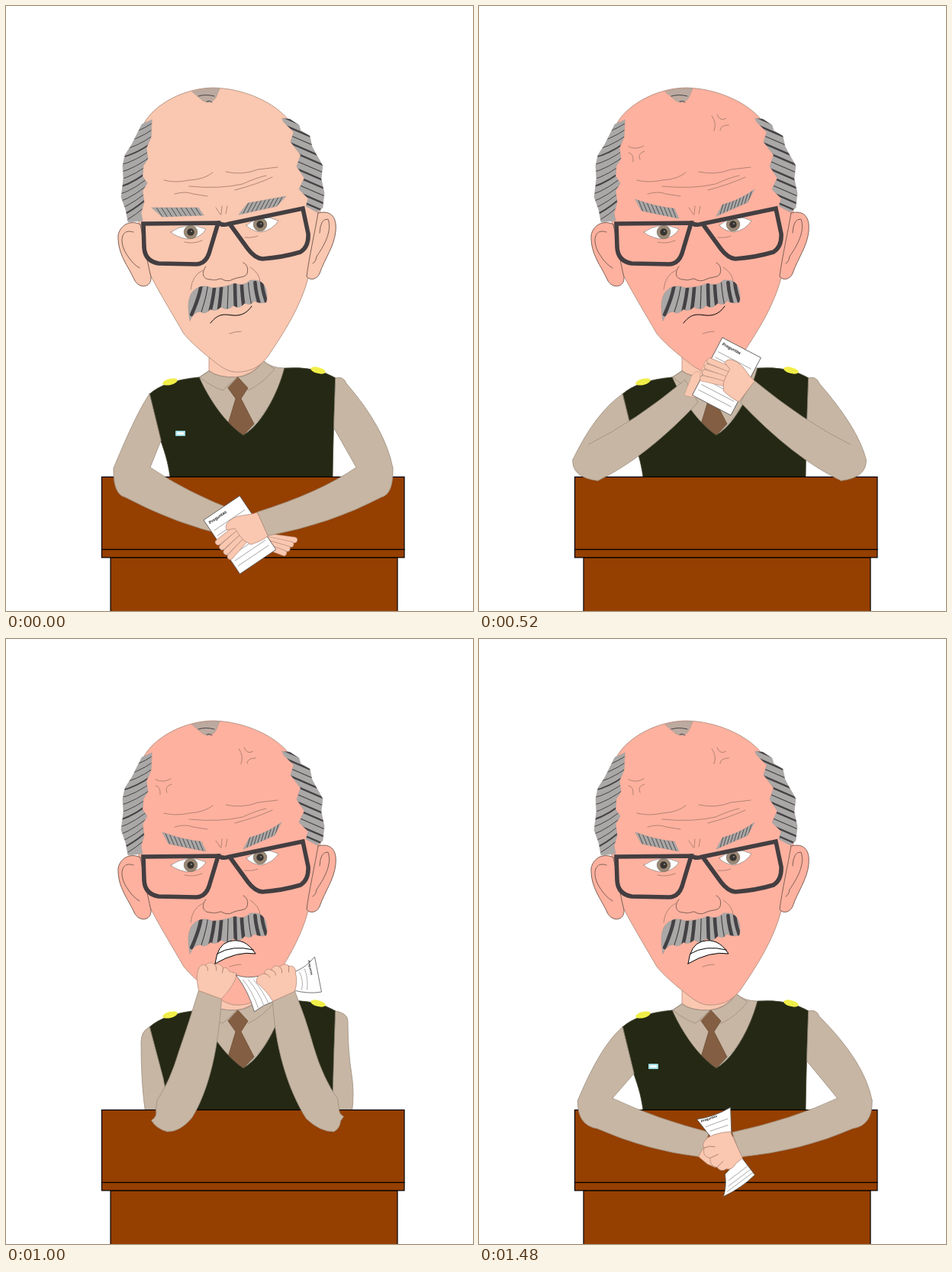
These frames come from a looping animation (612 px wide and 792 px high, 1.52 s). An HTML page:

```html
<!DOCTYPE html>
<html lang="es">
<head>
<meta charset="utf-8">
<title>Angry man at a desk</title>
<style>
html, body { margin: 0; width: 100%; height: 100%; overflow: hidden; background: #fff; }
svg { display: block; width: 612px; height: 792px; --skin: rgb(250,199,176); }
path, line { stroke-linecap: round; stroke-linejoin: round; }
.sleeve { fill: #c7b6a3; stroke: #9c8e80; stroke-width: .8; }
.face { fill: var(--skin); stroke: #a88878; stroke-width: .8; }
.hand { fill: #fac7b0; stroke: #b98f7e; stroke-width: .8; }
.finger { fill: none; stroke: #b98f7e; stroke-width: 8; }
.finger.in { stroke: #fac7b0; stroke-width: 6.6; }
.thin { fill: none; stroke: #a07868; stroke-width: .8; }
.ear { stroke: #7d6055; stroke-width: 1; }
.hair { fill: #aaa8a7; stroke: #a29c9a; stroke-width: .6; }
.dark { fill: none; stroke: #454245; }
.paper { fill: #fff; stroke: #555; stroke-width: .8; }
.rule { fill: none; stroke: #999; stroke-width: .8; }
.desk { fill: #953f00; stroke: #000; stroke-width: 1.2; }
.frame { fill: none; stroke: #433e41; stroke-width: 5.6; }
.ink { fill: none; stroke: #000; stroke-width: 1; }
text { font: bold 5.5px "Liberation Sans", Arial, sans-serif; fill: #222; }
</style>
</head>
<body>
<svg viewBox="0 0 612 792">
  <defs>
    <path id="hairL" d="M191 149L178 155 172 167 165 181 156 195 153 209 154 226 151 250 157 267 160 283 179 281 177 271 181 257 179 242 185 232 179 223 180 209 186 200 184 186 190 172Z"/>
    <path id="hairR" d="M362 147L372 148 384 156 386 163 398 170 401 184 407 195 415 209 413 226 417 245 415 264 408 270 393 262 396 252 384 240 391 225 381 210 386 195 373 178 377 165 364 152Z"/>
    <path id="tache" d="M241 412Q236 388 243 376Q254 362 270 369Q285 369 300 363Q311 368 320 359Q338 357 341 372Q343 383 341 388Q331 390 325 386Q321 393 313 389Q305 398 298 392Q290 400 282 394Q274 401 268 397Q260 405 255 400Q246 400 241 412Z"/>
    <path id="browL" d="M191 264L252 264 259 274 205 276Z"/>
    <path id="browR" d="M305 273L317 258 367 249 355 262Z"/>
    <path id="madL" d="M205 253Q232 263 256 265L262 278Q235 273 213 268Z"/>
    <path id="madR" d="M311 275L319 260Q342 254 361 240L352 257Z"/>
    <path id="vein" d="M-10-7Q0-2 10-8M-10 1Q-3 2-4 13M11-1Q1 2 5 10"/>
  </defs>

  <g id="body">
    <path class="sleeve" d="M253 486L268 476 337 464Q347 474 365 474Q350 530 311 562Q275 540 253 486Z"/>
    <path class="hand" stroke="none" d="M266 455L266 477Q276 486 300 486Q322 484 336 466L336 455Z"/>
    <path class="sleeve" d="M254 486L266 478Q278 487 303 486L284 503Q270 499 254 486ZM303 486Q325 484 337 465L352 475Q338 493 318 503Z"/>
    <path fill="#835e42" stroke="#694a33" stroke-width=".7" d="M304 486L317 500 308 514 325 547 311 562 291 547 301 514 291 500Z"/>
    <path fill="#242814" stroke="#4c4a38" stroke-width=".8" d="M188 508Q208 490 253 486C266 515 287 546 311 562C337 546 357 505 365 474Q405 471 432 487Q429 545 428 617L215 617C210 575 192 555 188 508Z"/>
    <ellipse cx="215" cy="492" rx="10" ry="4" fill="#f0ee48" transform="rotate(-14 215 492)"/>
    <ellipse cx="409" cy="477" rx="10" ry="4" fill="#f0ee48" transform="rotate(15 409 477)"/>
    <rect x="222" y="556" width="13" height="7" rx="1" fill="#9fdce0"/>
    <rect x="224" y="558" width="9" height="3" fill="#fff"/>
  </g>

  <g id="head">
    <path class="face" d="M180 155C194 128 235 107 272 107C312 108 352 126 371 150L400 200 412 268 396 356C386 394 364 428 343 459C330 476 314 480 299 479C284 477 275 466 266 460C255 451 242 440 233 429C218 403 205 382 190 354L180 325 174 285 172 200Z"/>
    <path class="face ear" d="M176 286C165 280 150 285 147 300C146 325 160 340 168 358C174 371 191 369 190 355C184 330 180 305 176 286Z"/>
    <path class="face ear" d="M409 271C425 267 434 275 432 295C430 315 418 330 411 350C408 358 398 360 394 354C397 330 405 295 409 271Z"/>
    <path class="thin ear" d="M167 296C150 290 148 310 158 325Q166 338 175 343M411 297Q412 278 422 279C428 295 416 315 407 328Q406 335 402 337"/>
    <path fill="#bcaaa0" stroke="#a29890" stroke-width=".6" d="M244 112Q260 107 280 108L275 120Q268 130 258 124Z"/>
    <path class="dark" d="M252 118Q262 115 273 118M263 125Q267 123 270 126"/>
    <g id="locks"></g>
    <path class="thin" d="M207 228Q222 232 240 228Q260 227 271 218M288 217Q310 222 330 214L356 211M240 236Q280 240 310 233Q330 224 341 222M221 246Q235 242 245 246L264 249M300 241Q330 233 349 224M275 264L281 273M282 273L283 262M288 272L290 262"/>
    <g id="calm"></g>
    <g id="mad">
      <use href="#vein" class="thin" transform="translate(206 191)"/>
      <use href="#vein" class="thin" transform="translate(314 153) rotate(-95)"/>
    </g>
    <path fill="#fff" stroke="#8d7d77" stroke-width=".7" d="M216 296Q238 281 262 292Q256 304 237 305Q222 302 216 296ZM315 287Q335 270 357 281Q350 293 334 296Q320 294 315 287Z"/>
    <g id="eyes"></g>
    <path class="thin" d="M234 309Q245 312 257 307M313 303Q323 304 330 301M242 371Q244 352 258 346M320 342Q333 350 333 362M293 429Q300 426 308 426"/>
    <path class="thin ear" d="M262 341C256 348 257 358 268 358C275 360 278 357 282 357Q290 362 297 358C305 354 314 356 316 350C318 342 315 338 311 336"/>
    <path class="frame" style="stroke-linejoin:miter" d="M180 285L278 284 266 324Q261 338 249 338L200 337Q182 334 181 316ZM293 285L389 265 396 298Q397 315 386 322Q363 329 336 331Q326 330 317 318ZM278 284Q285 288 293 285"/>
    <g id="whisk"></g>
    <path id="flat" class="ink" d="M268 415C279 401 287 404 298 405C310 406 317 400 322 393"/>
    <g id="snarl">
      <path class="ink" style="fill:#fff" d="M274 425Q277 400 292 396Q313 390 327 412Q303 408 274 425Z"/>
      <path class="ink" d="M277 412Q297 400 324 407"/>
    </g>
  </g>

  <g id="upper">
    <path class="sleeve" d="M188 508Q177 513 177 528Q177 585 183 622L215 622 206 575Z"/>
    <path class="sleeve" d="M432 487Q448 490 448 500Q448 540 453 570Q457 595 453 622L428 622Z"/>
  </g>

  <g id="desk">
    <rect class="desk" x="137" y="722" width="376" height="75"/>
    <rect class="desk" x="125.5" y="616.5" width="396.5" height="95"/>
    <rect class="desk" x="125.5" y="711.5" width="396.5" height="10.5"/>
  </g>

  <g id="swing">
    <g id="armL"><path class="sleeve"/><path class="sleeve"/></g>
    <g id="handL">
      <g class="open" id="openL" transform="translate(-14 0)"><path class="hand" d="M0-16L38-10Q60-10 66 4L66 18 50 32 0 16Z"/></g>
      <path class="hand fist" d="M-4-17Q5-32 18-33Q28-37 31-30Q39-26 33-18Q37 0 30 12L20 16Q10 17 5 17Z"/>
    </g>
    <g id="armR"><path class="sleeve"/><path class="sleeve"/></g>
    <g id="handR">
      <g class="open" id="openR">
        <g transform="translate(-77 -5) rotate(-34)">
          <rect class="paper" width="57" height="85"/>
          <path class="rule"/>
          <text x="4" y="9">Preguntas</text>
        </g>
      </g>
      <g class="fist" transform="rotate(-50.7)">
        <path class="paper" d="M-13-60Q5-46 29-40L2-11-17-27ZM-38 17Q-48 30-60 36Q-35 45-11 45L-7 16Z"/>
        <path class="rule" d="M-12-45L16-32M-12-37L10-26M-12-30L4-19M-40 26L-10 30M-46 31L-10 36M-52 35L-11 41"/>
        <text transform="translate(-12 -53) rotate(26)" style="font-size:4.5px">Preguntas</text>
        <path class="hand" d="M6-18Q-8-30-20-33Q-32-34-33-27Q-43-21-37-12Q-45-4-39 3Q-40 12-32 13Q-28 20-18 17L-7 18Z"/>
        <path class="thin" d="M-33-27Q-25-24-22-18M-37-12L-26-8M-39 3L-28 3"/>
      </g>
    </g>
  </g>

  <g id="raised">
    <g id="upL">
      <path class="sleeve" d="M190 603Q206 580 218 540Q232 500 244 460L274 470C270 535 258 590 235 627Q220 645 203 645Q188 641 182 630Q190 626 188 616Z"/>
      <path class="hand" d="M244 460Q240 442 243 434Q246 424 253 427Q259 421 265 426Q273 424 276 431Q281 428 284 435L294 438Q292 452 274 471Z"/>
      <path class="thin" d="M253 427Q257 430 256 434M265 426Q268 429 267 434M276 431L275 437"/>
    </g>
    <g id="upR">
      <path class="paper" d="M310 440Q325 445 341 441L360 474Q345 479 334 488Q326 460 310 440ZM386 436Q402 430 413 416L422 462Q405 465 386 460Z"/>
      <path class="rule" d="M319 446Q332 462 339 483M326 446Q340 462 346 479M333 446Q346 462 352 476M393 436Q399 447 396 459M400 432Q405 446 403 459"/>
      <text transform="translate(404 421) rotate(78)" style="font-size:4px">Preguntas</text>
      <path class="sleeve" d="M443 602Q424 575 412 535Q402 498 387 461L358 474C361 535 378 590 402 628Q420 645 438 645Q446 641 447 631L451 625Q445 622 445 616Z"/>
      <path class="hand" d="M358 474Q350 460 337 450Q335 440 347 438Q348 430 356 433Q360 425 367 429Q374 423 379 428Q389 427 388 438Q391 448 387 461Z"/>
      <path class="thin" d="M347 438Q353 439 354 443M356 433Q362 435 362 440M367 429Q371 432 370 437M379 428L379 436"/>
    </g>
  </g>
</svg>
<script>
const $ = id => document.getElementById(id);
const NS = 'http://www.w3.org/2000/svg';
const add = (parent, tag, attrs) => {
  const el = document.createElementNS(NS, tag);
  for (const k in attrs) el.setAttribute(k, attrs[k]);
  return parent.appendChild(el);
};
const lerp = (a, b, k) => a + (b - a) * k;
const times = (n, f) => Array.from({ length: n }, (_, i) => f(i));

// A filled shape with strands clipped to it
function tuft(parent, id, count, strand) {
  const clip = add(document.querySelector('defs'), 'clipPath', { id: id + 'Clip' });
  add(clip, 'use', { href: '#' + id });
  add(parent, 'use', { href: '#' + id, class: 'hair' });
  const g = add(parent, 'g', { 'clip-path': `url(#${id}Clip)` });
  times(count, i => {
    const [d, w] = strand(i);
    add(g, 'path', { class: 'dark', d, 'stroke-width': w });
  });
}
tuft($('locks'), 'hairL', 13, i => [`M148 ${170 + i * 9.6}Q170 ${168 + i * 9} 194 ${152 + i * 8.3}`, i % 4 == 3 ? 2 : 1]);
tuft($('locks'), 'hairR', 12, i => [`M360 ${144 + i * 10}L420 ${170 + i * 10}`, i % 3 == 2 ? 1.2 : 2.4]);
tuft($('whisk'), 'tache', 10, i => {
  const x = 256 + i * 8.8, lean = (x - 296) * .32;
  return [`M${x} 362Q${x + lean * .1} 378 ${x + lean} 404`, i % 3 == 1 ? 1.2 : 4.6];
});
const hatch = (x, y, dx, dy, lx, ly) => i => [`M${x + i * dx} ${y + i * dy}l${lx} ${ly}`, .9];
tuft($('calm'), 'browL', 9, hatch(196, 262, 6.4, 0, 9, 14));
tuft($('calm'), 'browR', 9, hatch(310, 273, 5.6, -1.2, 9, -17));
tuft($('mad'), 'madL', 9, hatch(208, 252, 5.6, 1.5, 7, 17));
tuft($('mad'), 'madR', 9, hatch(315, 276, 4.6, -2, 6, -20));

for (const [cx, cy] of [[242, 296], [333, 286]]) {
  add($('eyes'), 'circle', { cx, cy, r: 8.8, fill: '#9a8875', stroke: '#75685c', 'stroke-width': .6 });
  add($('eyes'), 'circle', { cx, cy, r: 4.7, fill: '#383431' });
  add($('eyes'), 'circle', { cx: cx + 1, cy: cy - 1, r: 1.1, fill: '#8c8780' });
}

// Four fingers fanned between a first and a last one
function fingers(parent, first, last) {
  times(4, i => {
    const [x1, y1, x2, y2] = first.map((v, j) => lerp(v, last[j], i / 3));
    const d = `M${x1} ${y1}L${x2} ${y2}`;
    for (const c of ['finger', 'finger in']) add(parent, 'path', { class: c, d });
  });
}
fingers($('openL'), [58, 16, 94, 21], [48, 26, 80, 38]);
fingers($('openR'), [-22, 20, -42, 43], [-32, 3, -58, 24]);
add($('openR'), 'path', { class: 'hand', stroke: 'none', d: 'M-7-15C-20-10-32-13-42-5Q-50 0-47 8L-36 6Q-30 16-24 22L-15 27Q0 22 7 16Z' });
document.querySelector('#openR .rule').setAttribute('d', times(8, i => `M4 ${19 + i * 8}H52`).join(''));

const LEFT = { id: 'armL', dir: -1, shoulder: 'M188 508', pit: [203, 569], bulge: [30, 532], wrist: [298, 280] };
const RIGHT = { id: 'armR', dir: 1, shoulder: 'M432 487Q442 484 446 494', pit: [430, 553], bulge: [10, 553], wrist: [336, 350] };

// Bends an arm so that the hands are at height h (0 desk, 1 chin); returns the wrist
function bend({ id, dir, shoulder, pit, bulge, wrist }, h) {
  const mid = 315 + 9 * (1 - h) ** 2;
  const reach = 183 + 108 * h - 92 * h * h;
  const at = (out, y) => [mid + dir * out, y];
  const elbow = at(reach, 605 - 10 * h);
  const heel = at(168 - 8 * h, 643 - 20 * h);
  const crook = at(reach - lerp(48, 23, h), 604 - 28 * h);

  const x = lerp(...wrist, h), y = 678 - 161 * h;
  const tilt = (50 * h - 24) * Math.PI / 180;
  const dx = dir * 17 * Math.sin(tilt), dy = -17 * Math.cos(tilt);

  const [upper, fore] = $(id).children;
  upper.setAttribute('d', `${shoulder}Q${at(reach - bulge[0], bulge[1])} ${elbow}L${heel}L${crook}L${pit}Z`);
  fore.setAttribute('d', `M${crook}Q${at(87 + 22 * h, 637 - 86 * h)} ${x + dx},${y + dy}L${x - dx},${y - dy}` +
    `Q${at(102 - 5 * h, 678 - 80 * h)} ${heel}Q${at(reach + 1, heel[1] - 4)} ${elbow}`);
  return [x, y];
}

const show = (el, on) => el.style.display = on ? '' : 'none';
const move = (id, t) => $(id).setAttribute('transform', t);
const CALM = [250, 199, 176], RED = [255, 177, 159];

function draw(t) {
  const torn = t >= 600, shaking = torn && t < 1080;
  const wide = shaking && (t - 600) / 40 % 2 == 1;
  const rage = Math.min(1, t / 520);

  document.querySelector('svg').style.setProperty('--skin', `rgb(${CALM.map((c, i) => lerp(c, RED[i], rage))})`);
  $('calm').style.opacity = 1 - rage;
  $('mad').style.opacity = rage;
  show($('flat'), !torn);
  show($('snarl'), torn);
  move('head', wide ? 'rotate(3.5 309 478)' : '');

  show($('upper'), shaking);
  show($('raised'), shaking);
  show($('swing'), !shaking);
  if (shaking) {
    move('upL', `translate(${wide ? 0 : 8.5})`);
    move('upR', `translate(${wide ? 0 : -8.5})`);
    return;
  }

  const h = torn ? lerp(.89, .1, (t - 1160) / 320) : Math.min(1.08, t / 400);
  const left = bend(LEFT, h), right = bend(RIGHT, h);
  move('handL', `translate(${left}) ` + (torn ? `rotate(${50 - 56 * h})` : `rotate(${-72 * h}) scale(${1 - .45 * h})`));
  move('handR', `translate(${right}) rotate(${57 * h})`);
  document.querySelectorAll('.open').forEach(el => show(el, !torn));
  document.querySelectorAll('.fist').forEach(el => show(el, torn));
}

const t0 = performance.now();
function tick() {
  const t = (performance.now() - t0) % 1520;
  draw(Math.floor(t / 40) * 40);
  requestAnimationFrame(tick);
}
tick();
</script>
</body>
</html>
```
